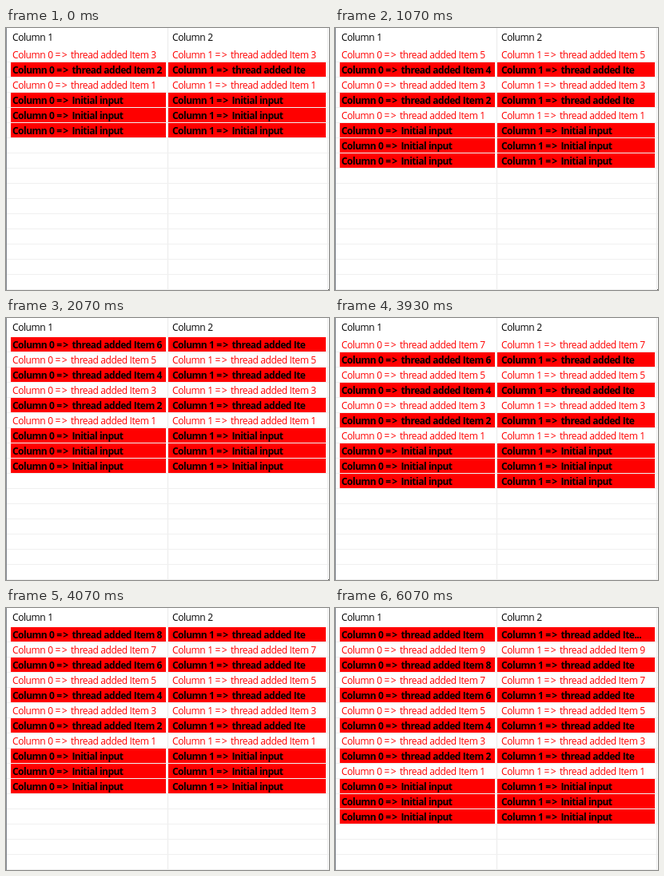
An HTML page that plays this animation: 404x328 px, repeating every 6870 ms.

```html
<!DOCTYPE html>
<html lang="en">
<head>
<meta charset="utf-8">
<title>Growing two-column list</title>
<style>
  html, body { margin: 0; width: 100%; height: 100%; overflow: hidden; background: #fff; }
  svg { display: block; }
  text {
    font: 12px "Open Sans", "Noto Sans", sans-serif;
    letter-spacing: -0.43px;
    word-spacing: 0.3px;
    white-space: pre;
  }
  .odd { fill: #f00; }
  .bold { font-weight: 700; letter-spacing: -0.53px; }
  .arrow { letter-spacing: 1.3px; }
</style>
</head>
<body>
<svg id="stage" width="404" height="328" viewBox="0 0 404 328"></svg>
<script>
const LOOP = 6870, FIRST_ADD = 70, ADD_EVERY = 1000;
const TOP = 24, PITCH = 19, WIDTH = 404, HEIGHT = 328;
const COLUMNS = [{ fill: 6, end: 200, text: 8 }, { fill: 203, end: 400, text: 208 }];
const ARROW = '<tspan class="arrow">=&gt;</tspan>';
const stage = document.getElementById('stage');

const rect = (x, y, w, h, color) =>
  `<rect x="${x}" y="${y}" width="${w}" height="${h}" fill="${color}"/>`;
const label = (x, y, words, style = '') =>
  `<text x="${x}" y="${y}" class="${style}">${words}</text>`;

// Bold labels are cut where they no longer fit their column.
function itemLabel(item, column) {
  if (item < 1) return 'Initial input';
  if (item % 2) return `thread added Item ${item}`;
  if (column) return 'thread added Ite' + (item > 9 ? '...' : '');
  return 'thread added Item' + (item > 9 ? '' : ` ${item}`);
}

function row(item, y) {
  const bold = item < 1 || item % 2 === 0;
  return COLUMNS.map((c, i) =>
    (bold ? rect(c.fill, y, c.end - c.fill, PITCH - 1, '#f00') : '') +
    label(c.text, y + 14, `Column ${i} ${ARROW} ${itemLabel(item, i)}`, bold ? 'bold' : 'odd')
  ).join('');
}

function render(newest, corner) {
  let out = rect(0, 0, 1, HEIGHT, '#828790');
  for (const x of [202, 402]) out += rect(x, 0, 1, HEIGHT, '#ebebeb');
  for (let y = TOP + PITCH - 1; y < HEIGHT; y += PITCH) out += rect(1, y, WIDTH - 1, 1, '#f0f0f0');
  COLUMNS.forEach((c, i) => out += label(c.text, 16, `Column ${i + 1}`));
  // Three initial rows sit below item 1.
  for (let item = newest; item > -3; item--) out += row(item, TOP + (newest - item) * PITCH);
  if (corner) out += rect(WIDTH - 1, HEIGHT - 1, 1, 1, '#444');
  stage.innerHTML = out;
}

let shown = '';
function tick() {
  const t = performance.now() % LOOP;
  const newest = 4 + Math.floor((t - FIRST_ADD) / ADD_EVERY);
  const corner = t < 3930;
  const state = `${newest} ${corner}`;
  if (state !== shown) render(newest, corner);
  shown = state;
  requestAnimationFrame(tick);
}
tick();
</script>
</body>
</html>
```
